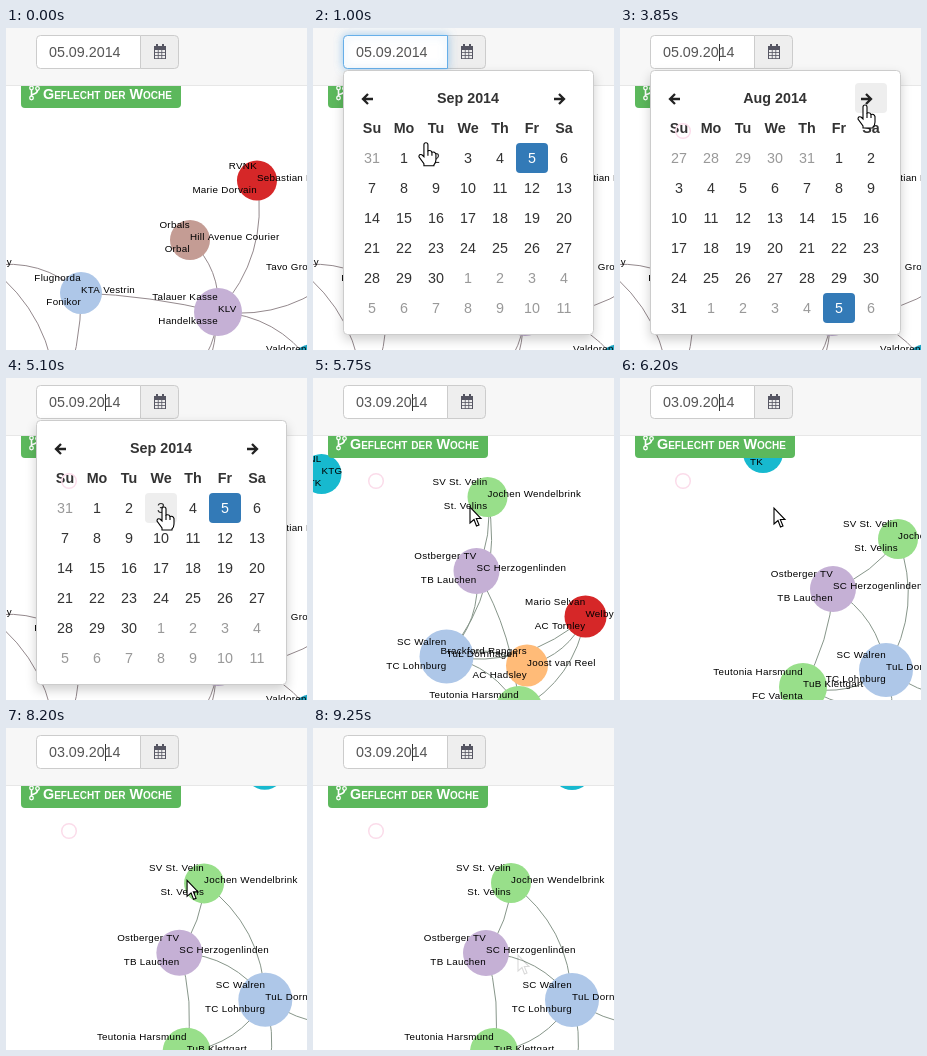
Write an HTML page with a canvas that moves like this. It is 301 by 322 pixels and loops after 9.7 s.

```html
<!DOCTYPE html>
<html lang="de">
<head>
<meta charset="utf-8">
<style>
html, body { margin: 0; width: 100%; height: 100%; overflow: hidden; background: #fff; }
canvas { display: block; width: 301px; height: 322px; }
</style>
</head>
<body>
<canvas id="stage"></canvas>
<script>
const W = 301, H = 322, LOOP = 9700, STEP = 50;
const SANS = '"Liberation Sans", Arial, sans-serif';
const canvas = document.getElementById('stage');
const dpr = window.devicePixelRatio || 1;
canvas.width = W * dpr;
canvas.height = H * dpr;
const ctx = canvas.getContext('2d');

const RED = '#d62728', BLUE = '#aec7e8', PURPLE = '#c5b0d5', GREEN = '#98df8a';

// Labels per node: top and bottom end at the centre, the middle one starts there.
const firstNodes = {
  red: { x: 251, y: 152.5, r: 20, fill: RED, text: ['RVNK', 'Sebastian Kolm', 'Marie Dorvain'] },
  brown: { x: 184, y: 212, r: 20, fill: '#c49c94', text: ['Orbals', 'Hill Avenue Courier', 'Orbal'] },
  blue: { x: 75, y: 265, r: 21, fill: BLUE, text: ['Flugnorda', 'KTA Vestrin', 'Fonikor'] },
  hub: { x: 212, y: 284, r: 24, fill: PURPLE, text: ['Talauer Kasse', 'KLV', 'Handelkasse'] },
  teal: { x: 306, y: 336, r: 20, fill: '#1fa5c4', text: ['Valdorens', '', ''] },
  west: { x: -18, y: 238 },
  south: { x: 50, y: 370 },
  south2: { x: 55, y: 370 },
  south3: { x: 170, y: 360 },
  south4: { x: 180, y: 400 },
  east: { x: 340, y: 240 }
};
const firstEdges = [
  ['red', 'hub'], ['brown', 'hub'], ['blue', 'hub', 0.05], ['west', 'blue'], ['west', 'south'],
  ['blue', 'south2', 0.1], ['east', 'hub'], ['hub', 'teal'], ['hub', 'south3'], ['hub', 'south4', 0.1]
];

// Keys of the settling layout: x, y at each of TIMES.
const TIMES = [5500, 5750, 6200, 6950];
const secondNodes = {
  cyan: { r: 20, fill: '#17b9cf', keys: [[-60, 108], [8.5, 96], [143, 75], [259, 42]], text: ['NL', 'KTG', 'TK'] },
  velin: { r: 20, fill: GREEN, keys: [[130, 112], [174.5, 119], [278, 161], [198, 155]],
    text: ['SV St. Velin', 'Jochen Wendelbrink', 'St. Velins'] },
  ostberg: { r: 23, fill: PURPLE, keys: [[142, 178], [163.5, 193], [213, 211], [173, 225]],
    text: ['Ostberger TV', 'SC Herzogenlinden', 'TB Lauchen'] },
  walren: { r: 27, fill: BLUE, keys: [[92, 262], [133.5, 278.5], [266, 292], [259, 272]],
    text: ['SC Walren', 'TuL Dornhagen', 'TC Lohnburg'] },
  orange: { r: 21, fill: '#ffbb78', keys: [[180, 250], [214, 287.5], [250, 400], [240, 392]],
    text: ['Brackford Rangers', 'Joost van Reel', 'AC Hadsley'] },
  tornley: { r: 21, fill: RED, keys: [[235, 205], [272.5, 238.5], [400, 315], [390, 290]],
    text: ['Mario Selvan', 'Welby Park', 'AC Tornley'] },
  harsmund: { r: 24, fill: GREEN, keys: [[190, 306], [206, 332], [183, 309], [181, 324]],
    text: ['Teutonia Harsmund', 'TuB Klettgart', 'FC Valenta'] }
};
const secondEdges = [
  ['velin', 'walren'], ['velin', 'ostberg', 0.15], ['ostberg', 'walren'], ['ostberg', 'harsmund', 0.12],
  ['tornley', 'walren'], ['walren', 'orange'], ['tornley', 'orange'], ['tornley', 'harsmund'],
  ['walren', 'harsmund']
];

// Pointer track: time, x, y.
const track = [
  [50, 101, 29], [700, 101, 29], [1250, 122, 180], [1400, 122, 180], [2000, 62, 89],
  [2300, 57, 80], [2400, 57, 79], [2800, 57, 79], [3700, 248, 79], [3850, 245, 77],
  [4350, 245, 77], [5100, 158, 129], [5400, 157, 129], [5750, 157, 129], [6200, 154, 130],
  [6950, 152, 133], [7350, 152, 133], [8300, 182, 153], [8500, 184, 156], [8700, 184, 156],
  [9250, 205, 227]
];

const handShape = new Path2D('M-2 2Q-2 0 0 0Q2 0 2 2V8Q5 7 6 9.5Q9 8.5 10 11.5V17Q10 20 8 22V23H-2V21L-7 14Q-7 11 -4 12L-2 14Z');
const handLines = new Path2D('M2 8V13M6 9.5V13');
const arrowShape = new Path2D('M0 0V16L4 12.5L6.5 19L9 18L6.3 11.5H11Z');
const beamShape = new Path2D('M-3 -7.5H-1L0 -6.5L1 -7.5H3M0 -6.5V6.5M-3 7.5H-1L0 6.5L1 7.5H3');

const clamp = v => Math.max(0, Math.min(1, v));
const ease = u => u * u * (3 - 2 * u);
const pulse = (t, a, b) => Math.sin(Math.PI * clamp((t - a) / (b - a)));

function box(x, y, w, h, r, fill, stroke) {
  ctx.beginPath();
  ctx.roundRect(x, y, w, h, r);
  if (fill) { ctx.fillStyle = fill; ctx.fill(); }
  if (stroke) { ctx.strokeStyle = stroke; ctx.lineWidth = 1; ctx.stroke(); }
}

function write(s, x, y, font, color, align = 'left') {
  ctx.font = font + ' ' + SANS;
  ctx.fillStyle = color;
  ctx.textAlign = align;
  ctx.fillText(s, x, y);
}

function label(s, x, y, align) {
  ctx.letterSpacing = '0.28px';
  write(s, x, y, '9.8px', '#000', align);
  ctx.letterSpacing = '0px';
}

function line(d, color, width) {
  ctx.strokeStyle = color;
  ctx.lineWidth = width;
  ctx.stroke(new Path2D(d));
}

function drawGraph(nodes, edges, color) {
  ctx.strokeStyle = color;
  ctx.lineWidth = 1;
  for (const [from, to, bend = 0.24] of edges) {
    const a = nodes[from], b = nodes[to], dx = b.x - a.x, dy = b.y - a.y;
    ctx.beginPath();
    ctx.moveTo(a.x, a.y);
    ctx.quadraticCurveTo((a.x + b.x) / 2 + dy * bend, (a.y + b.y) / 2 - dx * bend, b.x, b.y);
    ctx.stroke();
  }
  const shown = Object.values(nodes).filter(n => n.r);
  for (const n of shown) {
    ctx.beginPath();
    ctx.arc(n.x, n.y, n.r, 0, 7);
    ctx.fillStyle = n.fill;
    ctx.fill();
  }
  for (const n of shown) n.text.forEach((s, i) =>
    label(s, n.x, n.y - 12 + 12 * i, i === 1 ? 'left' : 'right'));
}

// Hermite curve through the keys, at rest at the end.
function along(keys, t, axis) {
  const last = TIMES.length - 1;
  if (t >= TIMES[last]) return keys[last][axis];
  let i = 0;
  while (t >= TIMES[i + 1]) i++;
  const slope = k => k === last ? 0 : k === 0
    ? (keys[1][axis] - keys[0][axis]) / (TIMES[1] - TIMES[0])
    : (keys[k + 1][axis] - keys[k - 1][axis]) / (TIMES[k + 1] - TIMES[k - 1]);
  const span = TIMES[i + 1] - TIMES[i], u = (t - TIMES[i]) / span, e = ease(u);
  const a = keys[i][axis], b = keys[i + 1][axis];
  return a * (1 - e) + b * e + span * u * (1 - u) * ((1 - u) * slope(i) - u * slope(i + 1));
}

function settle(t) {
  const sway = 1.2 * (pulse(t, 7350, 8300) + pulse(t, 8700, 9250));
  Object.values(secondNodes).forEach((n, i) => {
    n.x = along(n.keys, t, 0) + sway * Math.sin(t / 190 + i);
    n.y = along(n.keys, t, 1) + sway * Math.cos(t / 230 + i * 2);
  });
}

function drawBadge() {
  box(15, 50, 160, 30, 4, '#5cb85c');
  line('M25.5 62V68M31.5 62Q31.5 65 28 66T25.5 68', '#fff', 1.6);
  for (const [x, y] of [[25.5, 60], [31.5, 60.5], [25.5, 70]]) {
    ctx.beginPath();
    ctx.arc(x, y, 1.8, 0, 7);
    ctx.lineWidth = 1.3;
    ctx.stroke();
  }
  write('Geflecht der Woche', 37, 71, 'small-caps bold 14.4px', '#fff');
}

function drawBar(t, focus) {
  ctx.fillStyle = '#f7f7f7';
  ctx.fillRect(0, 0, W, 57);
  ctx.fillStyle = '#e7e7e7';
  ctx.fillRect(0, 57, W, 1);
  box(134.5, 7.5, 38, 33, [0, 4, 4, 0], '#eee', '#ccc');
  box(30.5, 7.5, 104, 33, [4, 0, 0, 4], '#fff', '#ccc');
  if (focus) {
    ctx.save();
    ctx.globalAlpha = focus;
    ctx.shadowColor = 'rgba(102,175,233,.6)';
    ctx.shadowBlur = 8 * dpr;
    box(30.5, 7.5, 104, 33, [4, 0, 0, 4], '#fff', '#66afe9');
    ctx.restore();
  }
  write(t < 5400 ? '05.09.2014' : '03.09.2014', 43, 29, '14.3px', '#555');
  const blinkOn = t >= 2300 || Math.floor((t - 300) / 500) % 2 === 0;
  if (t >= 300 && blinkOn) {
    ctx.fillStyle = '#333';
    ctx.fillRect(99, 16, 1, 17);
  }
  ctx.fillStyle = '#555562';
  ctx.fillRect(148, 18, 12, 13);
  ctx.fillRect(150, 16, 2, 3);
  ctx.fillRect(156, 16, 2, 3);
  ctx.fillStyle = '#eee';
  for (let i = 0; i < 9; i++) ctx.fillRect(149 + i % 3 * 3.6, 22 + Math.floor(i / 3) * 3, 2.8, 2.2);
}

function hoverCell(x, y) {
  const col = Math.floor((x - 43) / 32);
  if (col < 0 || col > 6) return null;
  if (y >= 55 && y < 85) return col === 0 || col === 6 ? [43 + col * 32, 55, 32] : [75, 55, 160];
  if (y >= 115 && y < 295) return [43 + col * 32, 115 + Math.floor((y - 115) / 30) * 30, 32];
  return null;
}

function drawPicker(t, alpha, p) {
  ctx.save();
  ctx.globalAlpha = alpha;
  ctx.save();
  ctx.shadowColor = 'rgba(0,0,0,.2)';
  ctx.shadowBlur = 12 * dpr;
  ctx.shadowOffsetY = 5 * dpr;
  box(30.5, 42.5, 250, 264, 4, '#fff');
  ctx.restore();
  box(30.5, 42.5, 250, 264, 4, '#fff', '#ccc');

  const hover = hoverCell(p.x, p.y);
  if (hover) box(hover[0], hover[1], hover[2], 30, 4, '#eee');
  line('M60 71H50M55 66L50 71L55 76M241 71H251M246 66L251 71L246 76', '#222', 2.3);

  const month = t >= 2550 && t < 4050 ? 7 : 8;
  write((month === 7 ? 'Aug' : 'Sep') + ' 2014', 155, 75, 'bold 14.3px', '#333', 'center');
  'Su Mo Tu We Th Fr Sa'.split(' ').forEach((d, i) =>
    write(d, 59 + i * 32, 105, 'bold 14.3px', '#333', 'center'));
  const lead = new Date(2014, month, 1).getDay();
  for (let i = 0; i < 42; i++) {
    const day = new Date(2014, month, 1 - lead + i);
    const x = 59 + i % 7 * 32, y = 130 + Math.floor(i / 7) * 30;
    const picked = day.getMonth() === 8 && day.getDate() === 5;
    if (picked) box(x - 16, y - 15, 32, 30, 4, '#337ab7');
    const color = picked ? '#fff' : day.getMonth() === month ? '#333' : '#999';
    write(day.getDate(), x, y + 5, '14.3px', color, 'center');
  }
  ctx.restore();
}

function pointer(t) {
  let i = 0;
  while (i < track.length - 2 && t >= track[i + 1][0]) i++;
  const [t0, x0, y0] = track[i], [t1, x1, y1] = track[i + 1];
  const e = ease(clamp((t - t0) / (t1 - t0)));
  return { x: x0 + (x1 - x0) * e, y: y0 + (y1 - y0) * e };
}

function drawPointer(t, p) {
  if (t < 50) return;
  ctx.save();
  ctx.translate(p.x, p.y);
  if (t >= 9250) ctx.globalAlpha = 0.15;
  ctx.strokeStyle = '#000';
  ctx.fillStyle = '#fff';
  ctx.lineWidth = 1.1;
  if (t < 5400 && p.y < 42) {
    ctx.stroke(beamShape);
  } else {
    const shape = t < 5400 ? handShape : arrowShape;
    ctx.fill(shape);
    ctx.stroke(shape);
    if (shape === handShape) ctx.stroke(handLines);
  }
  ctx.restore();
}

function drawRing() {
  ctx.beginPath();
  ctx.arc(63, 103, 7.3, 0, 7);
  ctx.strokeStyle = '#fbdcea';
  ctx.lineWidth = 1.5;
  ctx.stroke();
}

function draw(t) {
  ctx.setTransform(dpr, 0, 0, dpr, 0, 0);
  ctx.fillStyle = '#fff';
  ctx.fillRect(0, 0, W, H);

  if (t < 5450) {
    drawGraph(firstNodes, firstEdges, '#94898d');
    label('Tavo Group', 260, 242, 'left');
    label('y', 6, 237, 'right');
  } else if (t >= 5500) {
    settle(t);
    drawGraph(secondNodes, secondEdges, '#87968a');
  }
  drawBadge();

  const p = pointer(t);
  const fadeIn = clamp((t - 200) / 150);
  drawBar(t, fadeIn * clamp((2650 - t) / 150));
  const open = fadeIn * clamp((5450 - t) / 100);
  if (open > 0) drawPicker(t, open, p);
  if (t >= 2600) drawRing();
  drawPointer(t, p);
}

const start = performance.now();
function tick() {
  const t = (performance.now() - start) % LOOP;
  draw(Math.floor(t / STEP) * STEP);
  requestAnimationFrame(tick);
}
tick();
</script>
</body>
</html>
```
